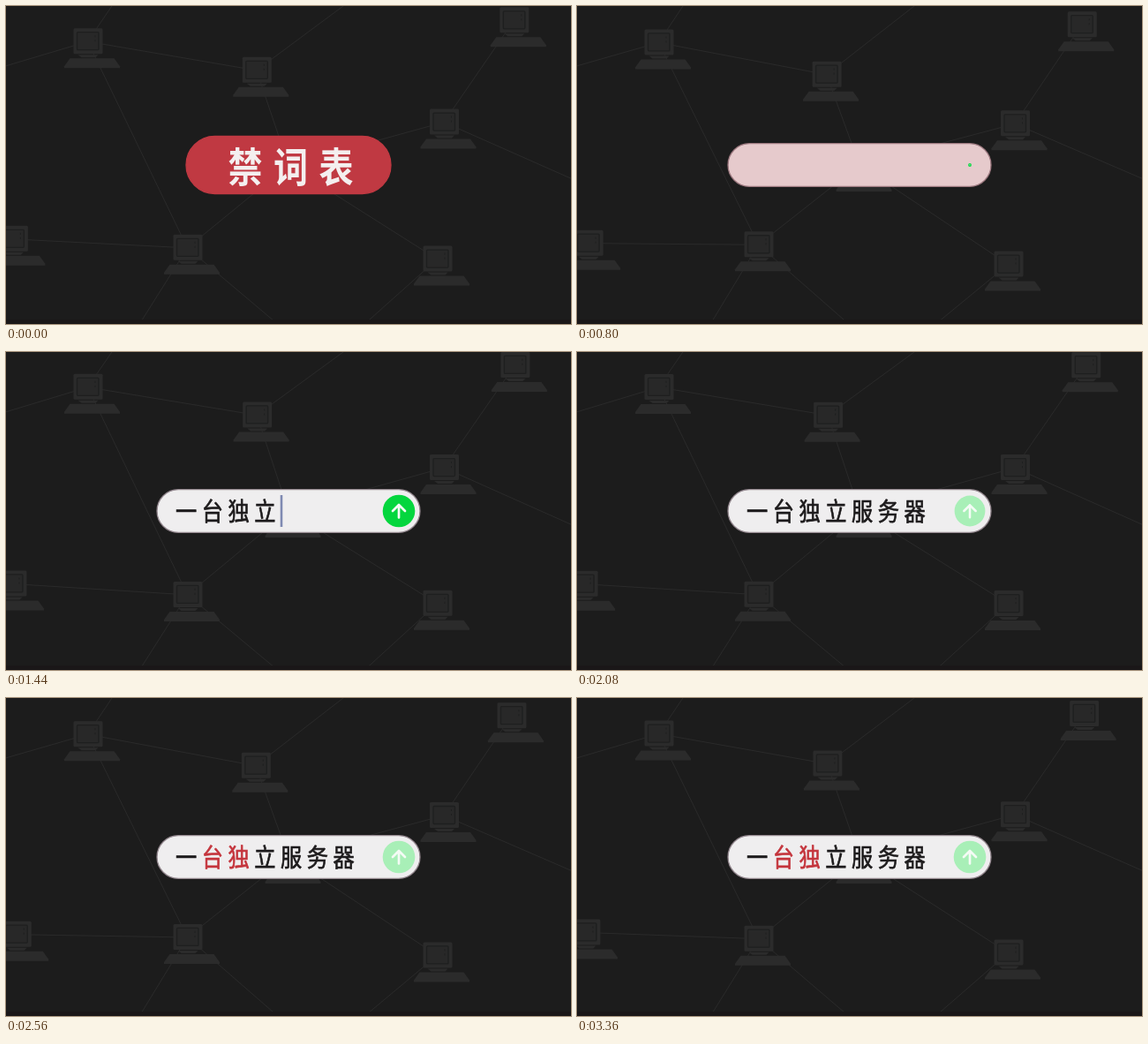
An HTML page for the animation above (3440 ms loop, 640x360 px).

```html
<!DOCTYPE html>
<html lang="zh">
<head>
<meta charset="utf-8">
<style>
  html, body { margin: 0; width: 100%; height: 100%; overflow: hidden; background: #1c1c1c; }
  svg { display: block; width: 640px; height: 360px; }
  text { font-family: "Noto Sans CJK SC", "Noto Sans CJK", sans-serif; text-anchor: middle; fill: currentColor; }
  #title { color: #f4efef; font-size: 46px; font-weight: 700; }
  #typed { font-size: 28.5px; stroke: currentColor; stroke-width: 0.7; }
  #links { stroke: #2a2a2a; fill: none; }
  .body { fill: #2b2b2b; }
  .screen { fill: #282828; stroke: #1e1f1f; stroke-width: 1.3; }
</style>
</head>
<body>
<svg viewBox="0 0 640 360">
  <defs>
    <clipPath id="inPill"><rect id="clip"/></clipPath>
    <g id="pc">
      <rect class="body" x="-16" y="-15" width="33" height="29" rx="1.5"/>
      <rect class="screen" x="-12" y="-10.5" width="24.5" height="20" rx="1"/>
      <path d="M8.5 -7v2M8.5 -2v2" stroke="#1e1f1f"/>
      <path class="body" d="M-11 15H12L9 18H-7Z"/>
      <path class="body" d="M-20 19H30L36.5 28V30H-26.5V28Z"/>
    </g>
  </defs>
  <rect width="640" height="360" fill="#1c1c1c"/>
  <path id="links"/>
  <g id="nodes"></g>
  <rect y="355" width="640" height="5" fill="#1a1718"/>
  <rect id="pill"/>
  <g clip-path="url(#inPill)"><g id="title"></g></g>
  <g id="typed"></g>
  <rect id="caret" y="162" width="2.6" height="36" fill="#7f8ab2"/>
  <g id="button">
    <circle id="disc" r="18.3"/>
    <path d="M0 7.5V-7M-7 0L0 -7L7 0" fill="none" stroke="#f4fbf5" stroke-width="2.7"
          stroke-linecap="round" stroke-linejoin="round"/>
  </g>
</svg>
<script>
const LOOP = 3440, STEP = 80;
const $ = id => document.getElementById(id);
const set = (el, attrs) => { for (const k in attrs) el.setAttribute(k, attrs[k]); };
const add = (parent, tag, attrs) => {
  const el = document.createElementNS("http://www.w3.org/2000/svg", tag);
  set(el, attrs);
  return parent.appendChild(el);
};
const lerp = (a, b, p) => a + (b - a) * p;
const smooth = p => p * p * (3 - 2 * p);
const progress = (t, from, to) => Math.min(1, Math.max(0, (t - from) / (to - from)));
const mix = (a, b, p) => `rgb(${a.map((v, i) => Math.round(lerp(v, b[i], p)))})`;
const show = on => on ? "visible" : "hidden";

// Computers: home x, y and sway x, y.
const homes = {
  A: [92.5, 40.5, 0, 1], B: [283.5, 74, -1, 4], C: [574.5, 17.5, -3, 4], D: [496, 132, 0, 1.5],
  E: [9, 265, 4, 4], F: [205.5, 273, 0, -3], G: [488.5, 288, 0, 5], H: [320, 180, 0, 0]
};
const links = ["AB", "AF", "BH", "CD", "DH", "EF", "FH", "GH"];
const loose = [["A", -4, 69], ["A", 122, -3], ["B", 382, 0], ["D", 644, 197],
               ["F", 150, 362], ["F", 310, 362], ["G", 404, 362]];
const nodes = {};
for (const id in homes) nodes[id] = add($("nodes"), "use", { href: "#pc" });

// Narrow letterforms, one per cell.
function letters(parent, str, x, y, pitch) {
  return [...str].map((ch, i) => {
    const el = add(parent, "text", { transform: `translate(${x + i * pitch} ${y}) scale(0.85 1)` });
    el.textContent = ch;
    return el;
  });
}
const PITCH = 29.75;
letters($("title"), "禁词表", 271, 198.5, 51.5);
const typed = letters($("typed"), "一台独立服务器", 204, 191.3, PITCH);

const RED = [192, 57, 66], WHITE = [239, 238, 239], EDGE = [146, 134, 141];
const INK = [29, 27, 28], ALERT = [196, 52, 60], GREEN = [4, 214, 62], PALE = [168, 239, 183];

function drawNetwork(t) {
  const sway = Math.cos((t - 650) / 2200 * 2 * Math.PI);
  const at = {};
  for (const id in homes) {
    const [x, y, dx, dy] = homes[id];
    at[id] = [x + dx * sway, y + dy * sway];
    set(nodes[id], { transform: `translate(${at[id]})` });
  }
  const lines = links.map(([a, b]) => `M${at[a]}L${at[b]}`)
    .concat(loose.map(([a, x, y]) => `M${at[a]}L${x},${y}`));
  set($("links"), { d: lines.join("") });
}

function drawPill(t) {
  const p = smooth(progress(t, 490, 770));
  const w = lerp(232, 298, p), h = lerp(65, 48.6, p);
  const box = { x: 320 - w / 2, y: 180 - h / 2, width: w, height: h, rx: h / 2 };
  const tint = progress(t, 640, 840);
  set($("clip"), box);
  set($("pill"), {
    ...box, fill: mix(RED, WHITE, tint), stroke: mix(RED, EDGE, tint), "stroke-width": 1.3
  });
  const fall = 64 * progress(t, 480, 720) ** 2;
  set($("title"), { transform: `translate(0 ${fall})`, visibility: show(t < 720) });
}

function drawTyping(t) {
  const n = Math.floor(7 * progress(t, 920, 1760));
  const alert = progress(t, 2240, 2400);
  typed.forEach((el, i) => set(el, {
    visibility: show(i < n),
    color: mix(INK, ALERT, i === 1 || i === 2 ? alert : 0)
  }));
  set($("caret"), { x: 191.7 + PITCH * n, visibility: show(t >= 960 && t < 1920) });
}

function drawButton(t) {
  const grow = smooth(progress(t, 740, 1040));
  const press = 1 - 0.05 * Math.sin(Math.PI * progress(t, 1920, 2240));
  set($("button"), { transform: `translate(445 180) scale(${grow * press})` });
  set($("disc"), { fill: mix(GREEN, PALE, progress(t, 1920, 2080)) });
}

function frame() {
  const t = Math.floor(performance.now() % LOOP / STEP) * STEP;
  drawNetwork(t);
  drawPill(t);
  drawTyping(t);
  drawButton(t);
  requestAnimationFrame(frame);
}
frame();
</script>
</body>
</html>
```
